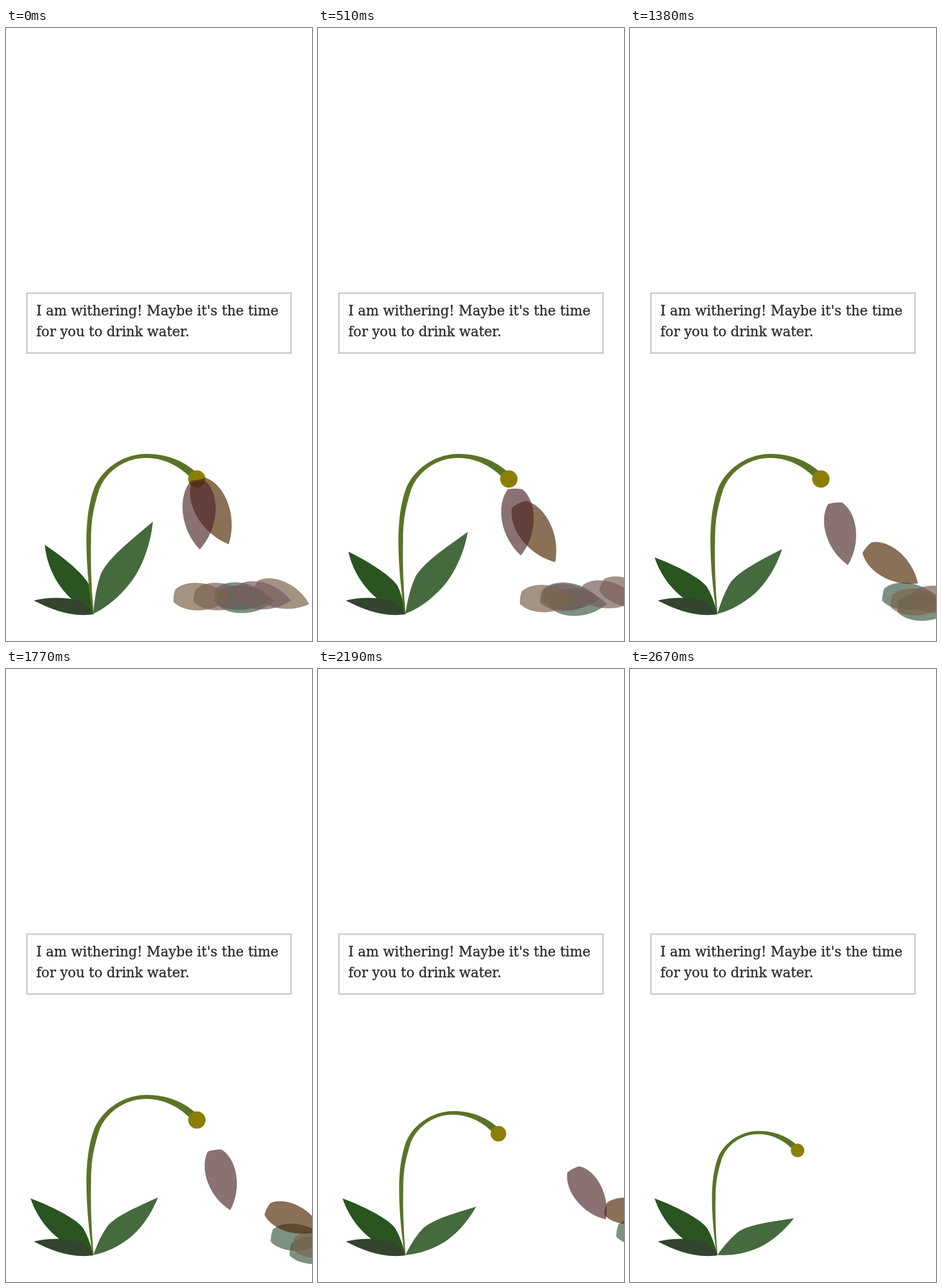
Recreate the animation shown at these times as an HTML page. Size 529 by 1058 pixels, loop 2.7 s.

```html
<!DOCTYPE html>
<html lang="en">
<head>
<meta charset="utf-8">
<title>Withering flower</title>
<style>
  html, body { margin: 0; width: 100%; height: 100%; overflow: hidden; background: #fff; }
  svg { display: block; width: 100%; height: 100%; }
  text { font: 23.3px "DejaVu Serif", "Noto Serif", serif; fill: #2b2b2b; stroke: #2b2b2b; stroke-width: 0.35; }
</style>
</head>
<body>
<svg viewBox="0 0 529 1058" xmlns="http://www.w3.org/2000/svg">
  <rect x="36.2" y="457.6" width="456.6" height="103.4" fill="#fff" stroke="#c4c4c4" stroke-width="2.2"/>
  <text x="52.5" y="496.3">I am withering! Maybe it's the time</text>
  <text x="52.5" y="531.5">for you to drink water.</text>

  <path id="leftLeaf" fill="#2a5520" d="M67 892C102 915 137 945 144 962C150 980 151 1000 151 1011C105 990 72 945 67 892Z"/>
  <path fill="#33452f" d="M48 988C82 980 115 984 131 990Q143 998 151 1012C115 1017 80 1005 48 988Z"/>
  <path id="rightLeaf" fill="#456a3e" d="M151 1011C153 985 157 960 165 940C180 912 215 885 254 852C250 892 234 938 208 966C190 987 170 1002 151 1011Z"/>
  <g id="stem">
    <path fill="#5a7426" d="M150 1012C144 975 139 930 139 885C139 850 143 822 151 798C162 765 200 735 243 735C275 735 305 745 329 767L318 775C298 755 272 742 242 742C203 742 170 768 160 800C151 830 147 850 147 885C146 930 148 970 151.500 1012Z"/>
    <circle cx="330" cy="778.500" r="15" fill="#8c7f08"/>
  </g>
  <g id="petals"></g>
</svg>
<script>
  const LOOP = 2700, STEP = 30, PHASE = 900;
  const PETAL = "M-13 -1.3Q0 -2.5 13 1.3C37 25 34 82 0 118C-34 82 -37 25 -13 -1.3Z";
  const FRESH = { mauve: "rgb(78,40,42)", brown: "rgb(78,38,0)" };
  const DRY = { mauve: "rgb(122,94,96)", brown: "rgb(124,101,77)", green: "rgb(72,98,74)" };
  const byId = id => document.getElementById(id);
  const progress = (t, from, to) => Math.min(1, Math.max(0, (t - from) / (to - from)));
  const petals = [];

  // Poses are [x, y, lean from straight down, scale]; drift and gust are changes per phase.
  function addPetal(fill, opacity, pose, drift, gust, release, ground = Infinity) {
    const node = document.createElementNS("http://www.w3.org/2000/svg", "path");
    node.setAttribute("d", PETAL);
    node.setAttribute("fill", fill);
    node.setAttribute("fill-opacity", opacity);
    byId("petals").append(node);
    petals.push({ node, pose, drift, gust, release, ground });
  }

  function addFallen(tint, x, y, lean, speed, sink) {
    addPetal(DRY[tint], 0.7, [x, y, lean, 0.83], [speed, sink, 0, -0.01], [80, -20, 0, 0], 2);
  }

  // Overlapping row on the ground, its far end lifted; green petals lag behind.
  addFallen("green", 366, 984, 87, 64, 9);
  for (const i of [2, 1, 0, 4, 3]) {
    const tint = i === 2 ? "green" : i % 2 ? "mauve" : "brown";
    const lift = i ** 3 / 4;
    addFallen(tint, 291 + 35 * i, 980 - lift, 88 - lift, tint === "green" ? 50 : 105, 6 - 3 * i);
  }

  addPetal(FRESH.brown, 0.66, [333, 781, 25.3, 1.03], [25, 72, 12, -0.05], [72, 10, 21, -0.08], 1, 932);
  addPetal(FRESH.mauve, 0.66, [333, 782, 1, 1], [14, 25, 7, -0.05], [171, 48, 35, -0.01], 2);

  function pivot(id, turn, scale) {
    byId(id).setAttribute("transform",
      `translate(151 1011.5) rotate(${turn}) scale(${scale}) translate(-151 -1011.5)`);
  }

  function draw(t) {
    const droop = progress(t, 0, 1800), shrink = progress(t, 1800, LOOP);
    pivot("leftLeaf", -12.9 * progress(t, 0, 900), 1);
    pivot("rightLeaf", 15.7 * droop + 16.4 * shrink, 1 - 0.215 * droop - 0.012 * shrink);
    pivot("stem", 0, 1 - 0.233 * shrink);

    const phase = t / PHASE;
    for (const { node, pose, drift, gust, release, ground } of petals) {
      const blown = Math.max(0, phase - release);
      const [x, y, lean, scale] = pose.map((v, i) => v + drift[i] * phase + gust[i] * blown);
      node.setAttribute("transform",
        `translate(${x} ${Math.min(y, ground)}) rotate(${-Math.min(lean, 70 + pose[2])}) scale(${scale})`);
    }
  }

  const start = performance.now();
  function tick() {
    const t = (performance.now() - start) % LOOP;
    draw(Math.floor(t / STEP) * STEP);
    requestAnimationFrame(tick);
  }
  tick();
</script>
</body>
</html>
```
